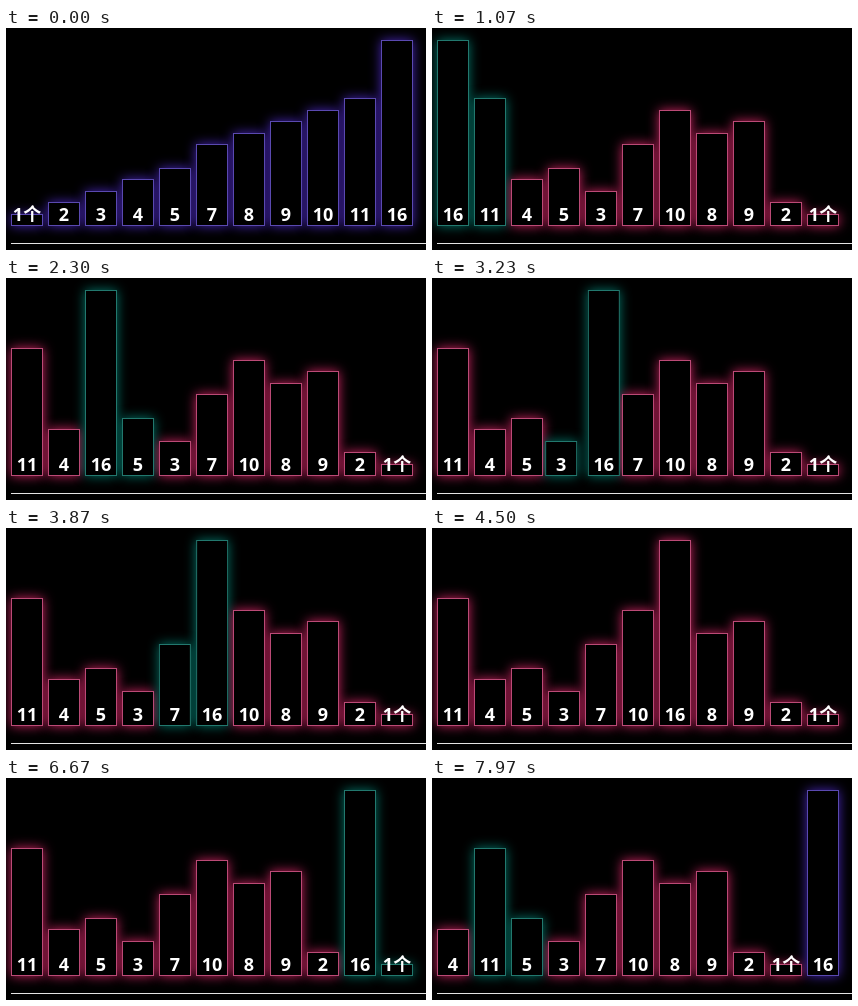
Recreate the animation shown at these times as an HTML page with a canvas. Size 420 by 222 pixels, loop 8000 ms.

```html
<!DOCTYPE html>
<html lang="zh">
<head>
<meta charset="utf-8">
<title>Bubble sort</title>
<style>
  html, body { margin: 0; width: 100%; height: 100%; overflow: hidden; background: #000; }
  canvas { display: block; }
</style>
</head>
<body>
<canvas id="stage" width="420" height="222"></canvas>
<script>
const ctx = document.getElementById('stage').getContext('2d');

const LOOP = 8000;
const SHUFFLE_AT = 840;
const FIRST_COMPARE = 1030;
const STEP = 608;
const PASS_PAUSE = 140;
const SWAP_DELAY = 185;
const MOVE = 230;

const SORTED = [1, 2, 3, 4, 5, 7, 8, 9, 10, 11, 16];
const SHUFFLED = [16, 11, 4, 5, 3, 7, 10, 8, 9, 2, 1];

const COLORS = {
  idle:    { glow: '#c92460', edge: '#bb4a76' },
  compare: { glow: '#047468', edge: '#22786e' },
  done:    { glow: '#4626b4', edge: '#5a49b0' }
};

const slotX = slot => 5 + 37 * slot;

function easeInOutBack(p) {
  const c = 2.595;
  if (p <= 0) return 0;
  if (p >= 1) return 1;
  const u = 2 * p;
  if (u < 1) return u * u * ((c + 1) * u - c) / 2;
  const v = u - 2;
  return (v * v * ((c + 1) * v + c) + 2) / 2;
}

// Returns each bar as { value, slot, state }; slot is fractional while moving.
function barsAt(time) {
  if (time < SHUFFLE_AT) {
    return SORTED.map((value, slot) => ({ value, slot, state: 'done' }));
  }
  const shuffle = easeInOutBack((time - SHUFFLE_AT) / MOVE);
  const bars = SHUFFLED.map((value, slot) => {
    const from = SORTED.indexOf(value);
    return { value, slot: from + (slot - from) * shuffle, state: 'idle' };
  });

  let start = FIRST_COMPARE;
  for (let last = bars.length - 1; last > 0; last--) {
    for (let i = 0; i < last; i++, start += STEP) {
      if (time < start) return bars;
      const a = bars[i], b = bars[i + 1];
      const swaps = a.value > b.value;
      const elapsed = time - start;
      if (elapsed < SWAP_DELAY + MOVE) {
        a.state = b.state = 'compare';
        if (swaps) {
          const shift = easeInOutBack((elapsed - SWAP_DELAY) / MOVE);
          a.slot += shift;
          b.slot -= shift;
        }
        return bars;
      }
      if (swaps) {
        bars[i] = b;
        bars[i + 1] = a;
        b.slot = i;
        a.slot = i + 1;
      }
    }
    bars[last].state = 'done';
    start += PASS_PAUSE;
  }
  return bars;
}

function draw(time) {
  const bottom = 198;
  const boxes = barsAt(time).map(({ value, slot, state }) => {
    const y = Math.round(197.6 - 11.6 * value);
    return { value, x: slotX(slot), y, w: 32, h: bottom - y, ...COLORS[state] };
  });

  ctx.fillStyle = '#000';
  ctx.fillRect(0, 0, 420, 222);

  // Glows lie beneath every bar, so the interiors stay black.
  ctx.shadowBlur = 12;
  for (const { x, y, w, h, glow } of boxes) {
    ctx.shadowColor = glow;
    ctx.fillRect(x, y, w, h);
  }
  ctx.shadowBlur = 0;
  ctx.shadowColor = 'transparent';

  ctx.font = 'bold 18px "Open Sans", "Noto Sans CJK SC", "Noto Sans CJK", sans-serif';
  ctx.textAlign = 'center';
  ctx.lineWidth = 1;
  for (const { x, y, w, h, edge } of boxes) {
    ctx.fillStyle = '#000';
    ctx.fillRect(x, y, w, h);
    ctx.strokeStyle = edge;
    ctx.strokeRect(x + 0.5, y + 0.5, w - 1, h - 1);
  }
  ctx.fillStyle = '#fff';
  for (const { value, x, w } of boxes) {
    ctx.fillText(value === 1 ? '1个' : value, x + w / 2, 193);
  }

  ctx.fillStyle = '#e4e4e4';
  ctx.fillRect(5, 215, 415, 1);
}

const origin = performance.now();
function tick() {
  draw((performance.now() - origin) % LOOP);
  requestAnimationFrame(tick);
}
tick();
</script>
</body>
</html>
```
